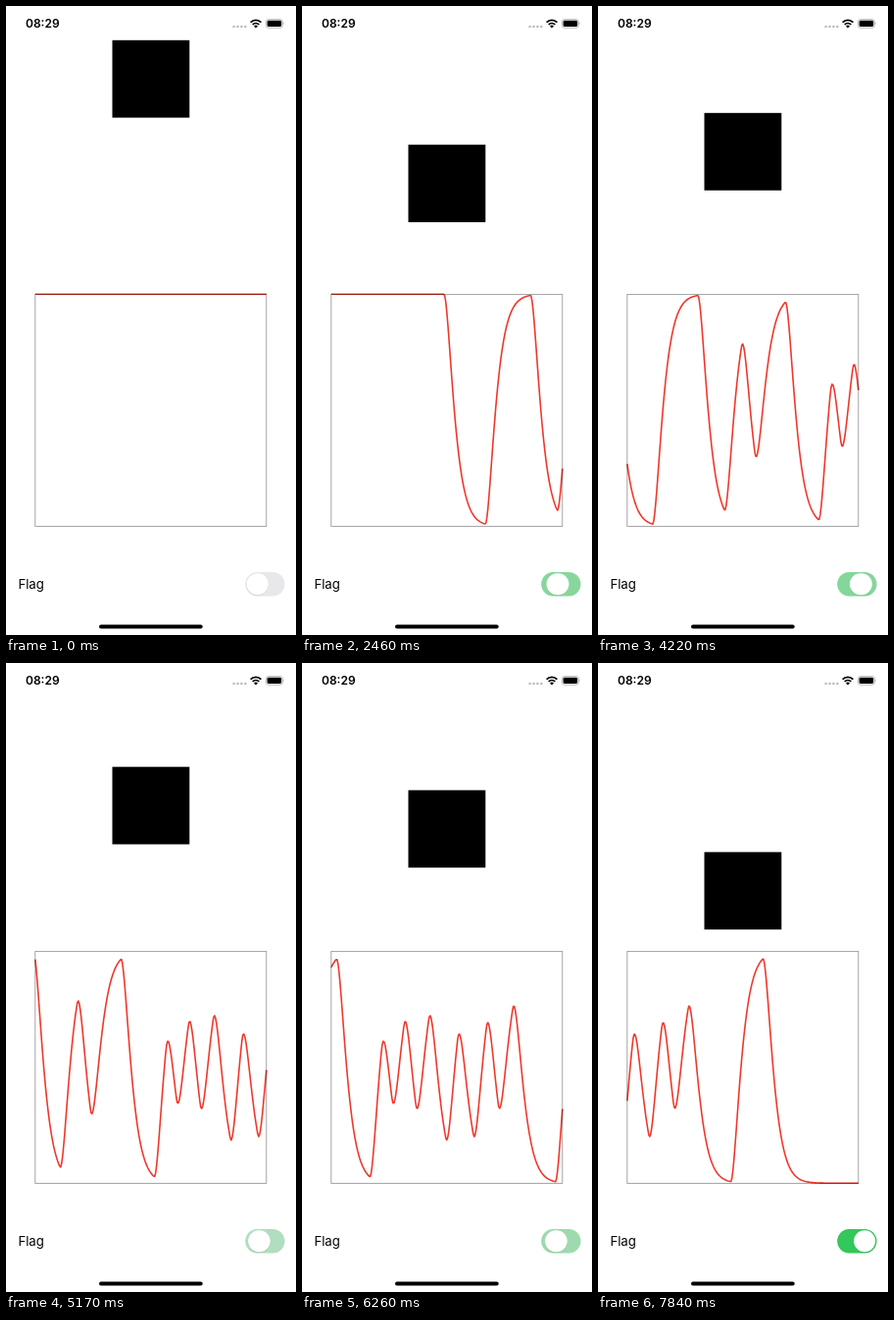
Write an HTML page that moves like this. It is 296 px wide and 640 px high and loops after 7900 ms.

```html
<!DOCTYPE html>
<html lang="en">
<head>
<meta charset="utf-8">
<title>Spring plot</title>
<style>
  html, body { margin: 0; width: 100%; height: 100%; overflow: hidden; background: #fff; }
  svg { display: block; width: 296px; height: 640px; }
  text { font-family: Inter, "Liberation Sans", sans-serif; }
</style>
</head>
<body>
<svg viewBox="0 0 296 640">
  <text x="20" y="22.3" font-size="12" font-weight="600">08:29</text>
  <g fill="#bcbcbc">
    <circle cx="232.6" cy="21" r="1.3"/><circle cx="236.5" cy="21" r="1.3"/>
    <circle cx="240.4" cy="21" r="1.3"/><circle cx="244.3" cy="21" r="1.3"/>
  </g>
  <g fill="none" stroke="#000" stroke-width="1.8">
    <path d="M249.6 16.6a7.6 7.6 0 0 1 10.8 0"/>
    <path d="M251.7 18.9a4.7 4.7 0 0 1 6.6 0"/>
  </g>
  <path d="M255 22.6l-2-2.1a2.9 2.9 0 0 1 4 0z"/>
  <rect x="265.4" y="13.6" width="17" height="8.6" rx="2.5" fill="none" stroke="#a5a5a5" stroke-width=".8"/>
  <rect x="266.6" y="14.8" width="14.6" height="6.2" rx="1.4"/>
  <path d="M283.2 16.6q1.2 1.2 0 2.6z" fill="#a5a5a5"/>

  <rect id="box" x="108.5" width="78.8" height="78.8"/>
  <path id="plot" fill="none" stroke="#f0372b" stroke-width="1.6" stroke-linejoin="round"/>
  <rect x="29.8" y="293.4" width="236" height="236" fill="none" stroke="#000" stroke-opacity=".4" stroke-width=".9"/>

  <text x="12.4" y="593" font-size="13.2">Flag</text>
  <rect id="track" x="244.2" y="576" width="40.3" height="24.5" rx="12.25"/>
  <rect id="shade" y="578.2" height="22" rx="11" fill="#000" opacity=".08"/>
  <rect id="knob" y="577.3" height="22" rx="11" fill="#fff"/>

  <rect x="95" y="629.6" width="105.7" height="4" rx="2"/>
</svg>
<script>
const LOOP = 7900;
const SIZE = 236, LEFT = 29.8, TOP = 293.3;
const RATE = 0.16;   // spring time constants per plotted pixel
const LEAD = 1.4;    // the live views run this many pixels ahead of the plot

// Time between flag toggles, in spring time constants
const GAPS = [6.74, 7.4, 4.33, 2.78, 2.16, 5.01, 5.44, 1.9, 1.7, 1.95, 1.92,
  2.135, 2.795, 1.9, 2.595, 2.12, 1.92, 2.39, 6.98, 5.256, Infinity];

// Bursts of eight evenly spaced screen updates, in ms
const BURSTS = [[960, 1700], [1820, 2560], [2680, 3440], [3550, 4320], [4420, 5170],
  [5290, 6040], [6160, 6870], [6970, 7730], [7840, 8600]];

const [box, plot, track, shade, knob] =
  ["box", "plot", "track", "shade", "knob"].map(id => document.getElementById(id));

// Critically damped spring chasing the flag; speed scales its stiffness
function spring(px, speed = 1) {
  let t = px * RATE, x = 0, v = 0, goal = 1;
  if (t <= 0) return { x, age: Infinity };
  for (const gap of GAPS) {
    const d = Math.min(gap, t) * speed, a = x - goal, b = v + a, e = Math.exp(-d);
    x = goal + (a + b * d) * e;
    v = (b - a - b * d) * e;
    if (t <= gap) return { x, age: t };
    t -= gap;
    goal = 1 - goal;
  }
}

function stepAt(ms) {
  let step = -1;
  BURSTS.forEach(([from, to], i) => {
    const n = Math.floor(7 * (ms - from + 6) / (to - from));
    if (n >= 0) step = 8 * i + Math.min(7, n);
  });
  return step;
}

function draw(ms) {
  const step = stepAt(ms);
  const edge = step < 0 ? -SIZE : 5.9 + 8.21 * step;
  const now = edge + LEAD;

  box.setAttribute("y", 34.8 + 157.6 * spring(now).x);

  let d = "";
  for (let x = 0; x <= SIZE; x++) {
    const y = TOP + SIZE * spring(edge - SIZE + x).x;
    d += (x ? "L" : "M") + (LEFT + x) + " " + y.toFixed(2);
  }
  plot.setAttribute("d", d);

  const tint = spring(now, 1.43).x;
  const mix = (off, on) => Math.round(off + (on - off) * tint);
  track.setAttribute("fill", `rgb(${mix(232, 52)},${mix(232, 199)},${mix(234, 89)})`);

  const slide = spring(now, 2.4);
  const stretch = 2.8 * Math.exp(-slide.age);
  for (const el of [shade, knob]) {
    el.setAttribute("x", 245.7 + slide.x * (15.4 - stretch));
    el.setAttribute("width", 22 + stretch);
  }
}

function tick() {
  draw(performance.now() % LOOP);
  requestAnimationFrame(tick);
}
tick();
</script>
</body>
</html>
```
